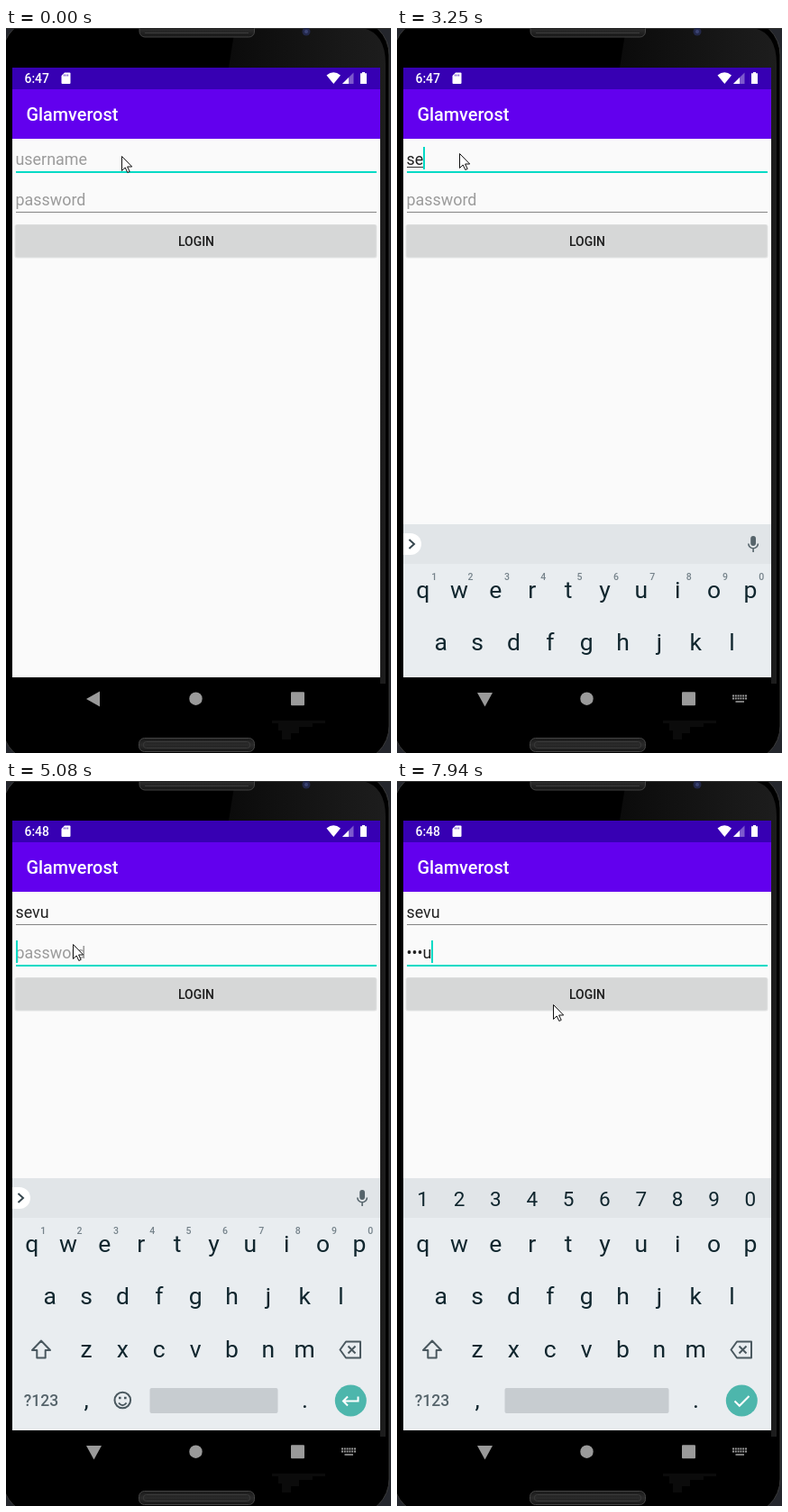
Recreate the animation shown at these times as an HTML page. Size 427 by 805 pixels, loop 8 s.

```html
<!DOCTYPE html>
<html lang="en">
<head>
<meta charset="utf-8">
<title>Login screen</title>
<style>
  html, body { margin: 0; width: 100%; height: 100%; overflow: hidden; background: #000; }
  svg { display: block; width: 427px; height: 805px; font-family: Roboto, sans-serif; }
  .mid { text-anchor: middle; }
  .field { font-size: 17.9px; }
  .med { font-weight: 500; }
</style>
</head>
<body>
<svg viewBox="0 0 427 805" xmlns="http://www.w3.org/2000/svg">
  <defs>
    <linearGradient id="gloss">
      <stop offset="0" stop-color="#0b0b0b"/>
      <stop offset="1" stop-color="#1d1d1d"/>
    </linearGradient>
    <linearGradient id="grille" x2="0" y2="1">
      <stop offset="0" stop-color="#1a1a1a"/>
      <stop offset=".5" stop-color="#2b2b2b"/>
      <stop offset="1" stop-color="#171717"/>
    </linearGradient>
    <clipPath id="screen"><rect x="7" y="44" width="408" height="677"/></clipPath>
  </defs>

  <!-- phone body -->
  <rect width="427" height="805" fill="#24262c"/>
  <rect x="-4" y="-10" width="429" height="825" rx="40" fill="#000" stroke="#3a3a3a"/>
  <path d="M254 0H396Q421 6 421 40V728H415V44H247Z" fill="url(#gloss)"/>
  <path d="M0 .5H427" stroke="#333"/>
  <circle cx="333" cy="4" r="4.5" fill="#23284a"/>
  <circle cx="333" cy="4" r="2" fill="#3b4474"/>
  <path d="M295 769H354V772H340V776H325V783H316V790H306V780H302V772H295Z" fill="#0b0b0b"/>
  <g fill="url(#grille)" stroke="#444">
    <rect x="148" y="-6" width="127.500" height="16" rx="6"/>
    <rect x="147.500" y="788.500" width="128" height="15" rx="6"/>
  </g>
  <g fill="none" stroke="#3c3c3c">
    <path d="M154 5.500H269"/>
    <rect x="152.500" y="792.500" width="118" height="7" rx="3"/>
  </g>

  <g clip-path="url(#screen)">
    <rect x="7" y="44" width="408" height="677" fill="#fafafa"/>
    <rect x="7" y="44" width="408" height="24" fill="#3700b3"/>
    <rect x="7" y="68" width="408" height="55" fill="#6200ee"/>
    <g fill="#fff">
      <text id="clock" class="med" x="20.500" y="61" font-size="13.900"></text>
      <path d="M65 49.500H70.500Q71.500 49.500 71.500 50.500V61Q71.500 62 70.500 62H62.500Q61.500 62 61.500 61V53Z"/>
      <path d="M355.500 52.500Q363.300 46 371 52.500L363.300 62Z"/>
      <path d="M385.500 49.500V62H373Z" opacity=".35"/>
      <path d="M380 55V62H373Z"/>
      <path d="M395 49H398V50.300H400V62H393V50.300H395Z"/>
      <text class="med" x="22.500" y="103" font-size="19.850">Glamverost</text>
    </g>
    <path d="M64.500 51.500V53.500M66.500 51.500V53.500M68.500 51.500V53.500" stroke="#3700b3" stroke-width=".8"/>

    <!-- form -->
    <rect id="line0" x="11" y="159" width="400"/>
    <rect id="line1" x="11" y="204" width="400"/>
    <rect x="9.500" y="218" width="402" height="37.500" rx="2.500" fill="#e4e5e5"/>
    <rect x="10.500" y="218.500" width="400" height="36" rx="2" fill="#d6d7d7"/>
    <text class="mid med" x="211" y="241.500" font-size="13.900" fill="#1c1c1c">LOGIN</text>
    <text id="text0" class="field" x="10.500" y="152"></text>
    <text id="text1" class="field" x="10.500" y="196.500"></text>
    <rect id="compose" x="11" y="154" height="1" fill="#333"/>
    <rect id="caret" width="2" height="25" fill="#03dac5"/>
    <g id="handle" fill="#03dac5"><circle cy="171" r="9.800"/><path d="M0 158L5 164H-5Z"/></g>

    <!-- keyboard -->
    <g id="keyboard">
      <rect x="7" y="441" width="408" height="44" fill="#e1e5e8"/>
      <rect x="7" y="485" width="408" height="236" fill="#e9edf0"/>
      <g id="strip">
        <rect x="-5" y="451" width="32" height="24" rx="12" fill="#fff"/>
        <path d="M13.500 458L19 463L13.500 468" fill="none" stroke="#37474f" stroke-width="2"/>
        <g fill="#56646b">
          <rect x="392.200" y="454" width="5.800" height="11" rx="2.900"/>
          <path d="M389.800 462.500a5.300 5.300 0 0 0 10.600 0M395.100 468V472" fill="none" stroke="#56646b" stroke-width="1.600"/>
        </g>
        <g id="suggest" font-size="17.900" class="mid" fill="#6a757b">
          <path d="M150.500 451V475M269.500 451V475" stroke="#c3c9cd"/>
          <text x="97" y="470">sevu</text>
          <text x="209.500" y="470" font-weight="700" fill="#000">Sevu</text>
          <text x="322" y="470">Sevua</text>
        </g>
      </g>
      <g id="digits" class="mid" font-size="22.500" fill="#10262e"></g>
      <g id="hints" class="mid med" font-size="10.500" fill="#75828a"></g>
      <g id="keys" class="mid" font-size="26.500" fill="#10262e"></g>
      <g fill="none" stroke="#4a585f" stroke-width="2">
        <path d="M39 621.500L49 632H43.700V640.500H34.300V632H29Z" stroke-linejoin="round"/>
        <path d="M377 622.500H393V640.500H377L370.500 631.500Z" stroke-linejoin="round"/>
        <path d="M379.500 627.500L387.500 635.500M387.500 627.500L379.500 635.500"/>
      </g>
      <text class="mid med" x="39" y="694" font-size="17.500" fill="#56646b">?123</text>
      <g id="emoji" fill="none" stroke="#4a585f" stroke-width="2">
        <circle cx="129.300" cy="687.500" r="8.800"/>
        <path d="M125 690.500Q129.300 696 133.600 690.500"/>
        <path d="M125 685H127.600M131 685H133.600" stroke-width="2.600"/>
      </g>
      <rect id="space" y="674" height="28" rx="2" fill="#c7ccd0"/>
      <circle cx="382.300" cy="688" r="17.500" fill="#4db6ac"/>
      <path id="action" fill="none" stroke="#fff" stroke-width="2"/>
    </g>
  </g>

  <!-- navigation bar -->
  <g fill="#9a9a9a">
    <path id="back"/>
    <circle cx="210.500" cy="744.700" r="7.200"/>
    <rect x="316" y="737.300" width="15" height="15" rx="1"/>
    <g id="imeIcon" stroke="#9a9a9a" fill="none">
      <path d="M372 741.500H388M372 744.500H388" stroke-width="2" stroke-dasharray="2 .8"/>
      <path d="M375.500 748H385" stroke-width="1.600"/>
    </g>
  </g>

  <path id="mouse" d="M.5 .5V16.500L4.200 13L6.800 18.500L9.200 17.400L6.600 12H11.700Z" fill="#fff" stroke="#111"/>
</svg>

<script>
const LOOP = 8000, TEAL = '#03dac5';
const $ = id => document.getElementById(id);
const set = (id, attrs) => {
  for (const k in attrs) $(id).setAttribute(k, attrs[k]);
};
const show = (id, on) => set(id, { display: on ? 'inline' : 'none' });

function addRow(parent, chars, x, y, step = 40.35) {
  [...chars].forEach((ch, i) => {
    const t = document.createElementNS('http://www.w3.org/2000/svg', 'text');
    t.setAttribute('x', x + i * step);
    t.setAttribute('y', y);
    t.textContent = ch;
    $(parent).append(t);
  });
}
addRow('digits', '1234567890', 28.7, 472);
addRow('hints', '1234567890', 41.2, 503);
addRow('keys', 'qwertyuiop', 28.7, 522.5);
addRow('keys', 'asdfghjkl', 48.8, 581);
addRow('keys', 'zxcvbnm', 89, 639.5);
addRow('keys', ',.', 89, 696, 242.5);

// Each step overrides part of the state until the next one.
const steps = [
  [0, { mouse: [128, 142], caret: 0, focus: 0, user: '', pass: '', ime: 0, lift: 280,
        clock: '6:47', suggest: 0, handle: 0, compose: 1, secret: 0 }],
  [290, { caret: 1 }],
  [710, { caret: 0 }],
  [1240, { caret: 1 }],
  [1510, { ime: 1 }],
  [1910, { mouse: [92, 147] }],
  [2030, { mouse: [66, 147] }],
  [2560, { mouse: [67, 143] }],
  [2700, { mouse: [69, 139] }],
  [2850, { user: 's' }],
  [3130, { user: 'se' }],
  [3250, { lift: 110 }],
  [3400, { user: 'sev', lift: 0, clock: '6:48' }],
  [3530, { user: 'sevu' }],
  [3960, { suggest: 1 }],
  [4090, { handle: 1 }],
  [4230, { mouse: [71, 154] }],
  [4360, { mouse: [73, 172] }],
  [4500, { mouse: [74, 181] }],
  [4650, { handle: 0, compose: 0, focus: 1 }],
  [5080, { suggest: 0 }],
  [5230, { caret: 0 }],
  [5510, { pass: 's', caret: 1, secret: 1 }],
  [5630, { pass: '•e' }],
  [5900, { pass: '••v' }],
  [6460, { caret: 0 }],
  [6720, { pass: '•••u', caret: 1 }],
  [7120, { caret: 0 }],
  [7520, { caret: 1, mouse: [104, 214] }],
  [7660, { mouse: [148, 260] }],
  [7800, { mouse: [168, 267] }],
  [7940, { mouse: [173, 248] }]
];

const stateAt = t => Object.assign({}, ...steps.filter(s => s[0] <= t).map(s => s[1]));

function drawField(i, value, hint, focused) {
  const text = $('text' + i);
  text.textContent = value || hint;
  text.setAttribute('fill', value ? '#212121' : '#9b9b9b');
  set('line' + i, { fill: focused ? TEAL : '#858585', height: focused ? 2 : 1 });
  return value ? text.getComputedTextLength() : 0;
}

function draw(t) {
  const s = stateAt(t);
  const widths = [
    drawField(0, s.user, 'username', s.focus === 0),
    drawField(1, s.pass, 'password', s.focus === 1)
  ];
  const end = 10.5 + widths[s.focus];

  $('clock').textContent = s.clock;
  show('caret', s.caret);
  set('caret', { x: Math.round(end), y: s.focus ? 177 : 132 });
  show('compose', s.compose && s.user);
  set('compose', { width: widths[0] });
  show('handle', s.handle);
  set('handle', { transform: `translate(${Math.round(end) + 1} 0)` });

  show('keyboard', s.lift < 280);
  set('keyboard', { transform: `translate(0 ${s.lift})` });
  show('strip', !s.secret);
  show('suggest', s.suggest);
  show('digits', s.secret);
  show('hints', !s.secret);
  show('emoji', !s.secret);
  set('space', s.secret ? { x: 119.5, width: 182 } : { x: 159.5, width: 142 });
  set('action', { d: s.secret
    ? 'M374.500 688.500L379.800 693.800L390.500 683'
    : 'M390.500 683.500V688.500H374.500M379 683.500L374 688.500L379 693.500' });

  set('back', { d: s.ime ? 'M89 738H106L97.500 753.500Z' : 'M104 736.500V753.500L89 745Z' });
  show('imeIcon', s.ime);
  set('mouse', { transform: `translate(${s.mouse})` });
}

const start = performance.now();
function tick() {
  draw((performance.now() - start) % LOOP);
  requestAnimationFrame(tick);
}
tick();
</script>
</body>
</html>
```
